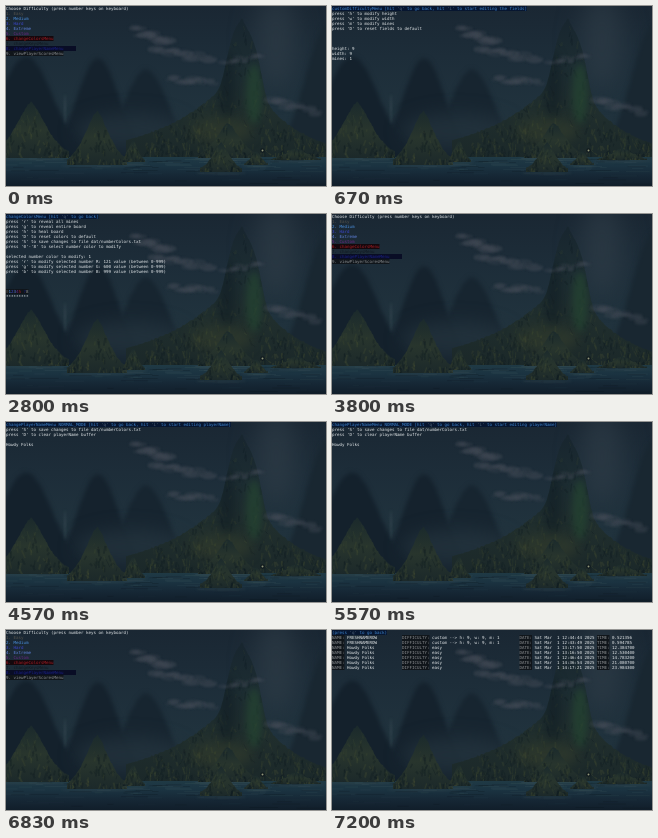
An HTML page with a canvas that plays this animation: 320 px wide and 180 px high, repeating every 8 s.

```html
<!DOCTYPE html>
<html lang="en">
<head>
<meta charset="utf-8">
<title>Terminal minesweeper menus</title>
<style>
html, body { margin: 0; width: 100%; height: 100%; overflow: hidden; background: #17222c; }
canvas { display: block; width: 320px; height: 180px; }
</style>
</head>
<body>
<canvas id="stage" width="320" height="180"></canvas>
<script>
const W = 320, H = 180, LOOP = 8000, SHORE = 152;
const ZOOM = 4, CELL_W = 2.5, CELL_H = 5;
const WHITE = '#e6eaec', BLUE = '#3f86cf', NAVY = '#071630', GREY = '#8d9093', BLACK = '#10151a';
const PALETTE = ['#55534c', '#4a90e0', '#3d47d2', '#5f82de', '#6a2785', '#a91e25', '#101820', '#1b2088', GREY];

function layer(zoom, paint) {
  const c = document.createElement('canvas');
  c.width = W * zoom;
  c.height = H * zoom;
  const g = c.getContext('2d');
  g.scale(zoom, zoom);
  paint(g);
  return c;
}

// Seeded generator, so the painting is the same on every load
let seed = 17;
const random = () => (seed = (seed * 16807) % 2147483647) / 2147483647;
const spread = size => (random() + random() - 1) * size;

function vertical(g, top, bottom, ...colors) {
  const r = g.createLinearGradient(0, top, 0, bottom);
  colors.forEach((c, i) => r.addColorStop(i / (colors.length - 1), c));
  return r;
}

function glow(g, color, x, y, rx, ry, blur) {
  g.filter = `blur(${blur}px)`;
  g.fillStyle = color;
  g.beginPath();
  g.ellipse(x, y, rx, ry, 0, 0, 7);
  g.fill();
  g.filter = 'none';
}

// Outline of the land under a height function, with a slightly broken edge
function land(height, from, to, base, rough) {
  const p = new Path2D();
  p.moveTo(from, base);
  for (let x = from; x <= to; x++) p.lineTo(x, base - height(x) + spread(rough));
  p.lineTo(to, base);
  return p;
}

const bell = (d, power) => Math.exp(-(Math.abs(d) ** power));

function distantHill(g, color, x, top, half) {
  g.fillStyle = color;
  g.filter = 'blur(2px)';
  g.fill(land(px => (SHORE - top) * bell((px - x) / half, 2), x - half * 2, x + half * 2, SHORE, 2));
  g.filter = 'none';
}

// Brush dabs running down a slope: olive towards the light, dark in the folds
function dabs(g, count, height, from, to, base) {
  for (let i = 0; i < count; i++) {
    const x = from + random() * (to - from);
    const depth = random();
    const y = base - height(x) * (1 - depth);
    g.strokeStyle = i % 2 ? `rgba(76,84,52,${0.12 + depth * 0.2})` : 'rgba(11,22,29,.25)';
    g.lineWidth = 0.6 + random() * 1.5;
    g.beginPath();
    g.moveTo(x, y);
    g.lineTo(x + spread(4), y + 2 + random() * 6);
    g.stroke();
  }
}

function islet(g, x, top, half, base = SHORE) {
  const h = base - top, from = x - half, to = x + half;
  const height = px => h * bell((px - x) / half * 1.7, 1.5);
  const outline = land(height, from, to, base, 1.2);
  glow(g, 'rgba(64,82,86,.35)', x, base + 1, half * 1.2, 1.2, 1);
  g.save();
  g.fillStyle = vertical(g, top, base, '#1b2a2c', '#28352d', '#1c292a');
  g.fill(outline);
  g.clip(outline);
  dabs(g, half * 3, height, from, to, base);
  g.restore();
}

function cloud(g, x0, y0, x1, y1, size) {
  for (let t = 0; t <= 1; t += 0.06) {
    const r = size * (0.5 + random() * 0.6);
    glow(g, 'rgba(72,78,87,.27)', x0 + (x1 - x0) * t + spread(size), y0 + (y1 - y0) * t + spread(size * 0.7), r * 1.5, r * 0.55, 1.2);
  }
}

// A broad foot, longer on the left, carrying a steep rounded tower
const peak = x => 94 * bell((x - 236) / (x < 236 ? 70 : 45), 1) + 46 * bell((x - 238) / 19, 4);

function mountain(g) {
  const outline = land(peak, 120, W, SHORE, 1);
  g.save();
  g.fillStyle = vertical(g, 16, SHORE, '#18262f', '#1d2d32', '#202e2d', '#1b2829');
  g.fill(outline);
  g.clip(outline);
  dabs(g, 380, peak, 140, W, SHORE);
  glow(g, 'rgba(14,26,34,.5)', 221, 80, 9, 35, 5);
  glow(g, 'rgba(36,67,50,.75)', 248, 88, 8, 30, 3);
  glow(g, 'rgba(63,70,45,.4)', 215, 125, 32, 13, 6);
  g.restore();
}

function water(g) {
  g.fillStyle = vertical(g, SHORE - 2, H, '#203a45', '#1b3341', '#162735', '#111e2a');
  g.fillRect(0, SHORE - 1, W, H);
  for (let i = 0; i < 110; i++) {
    const depth = random() ** 1.5;
    g.fillStyle = i % 3 ? `rgba(68,93,98,${0.3 * (1 - depth)})` : 'rgba(8,18,27,.25)';
    g.fillRect(random() * W - 10, SHORE + depth * 26, 5 + random() * 25, 0.8);
  }
}

function pointer(g) {
  glow(g, '#0f181d', 256.5, 144.5, 2.2, 2.2, 0.3);
  glow(g, '#929679', 256.5, 144.5, 1, 1, 0.3);
}

function landscape(g) {
  g.fillStyle = vertical(g, 0, SHORE, '#1a2733', '#1d2d39', '#20323d', '#1f313b');
  g.fillRect(0, 0, W, H);
  glow(g, 'rgba(48,62,73,.65)', 270, 35, 22, 48, 12);
  distantHill(g, '#172530', 140, 64, 32);
  distantHill(g, '#15222d', 92, 52, 30);
  distantHill(g, '#14212c', 20, 50, 38);
  distantHill(g, '#192731', 322, 18, 32);
  glow(g, 'rgba(40,58,68,.6)', 125, 125, 55, 18, 9);
  glow(g, 'rgba(65,84,93,.45)', 59, 103, 1, 15, 1);

  cloud(g, 126, 23, 165, 36, 6);
  cloud(g, 152, 42, 206, 54, 6);
  cloud(g, 162, 73, 207, 76, 5);
  mountain(g);
  cloud(g, 220, 56, 256, 50, 4);
  cloud(g, 262, 94, 312, 106, 6);

  water(g);
  islet(g, 25, 96, 38);
  islet(g, 91, 105, 30, 159);
  islet(g, 127, 134, 12, 156);
  islet(g, 222, 117, 30);
  islet(g, 215, 136, 21, 166);
  islet(g, 250, 145, 12, 159);
  islet(g, 290, 142, 25, 154);
  pointer(g);
}

function put(g, col, row, text, fg = WHITE, bg, width = text.length) {
  if (bg) {
    g.fillStyle = bg;
    g.fillRect(col * CELL_W, row * CELL_H, width * CELL_W, CELL_H);
  }
  g.fillStyle = fg;
  [...text].forEach((ch, i) => g.fillText(ch, (col + i) * CELL_W, row * CELL_H + 3.9));
}

function lines(g, row, texts) {
  texts.forEach((t, i) => put(g, 0, row + i, t));
}

// Header in blue with its key names dimmed
function header(g, text) {
  put(g, 0, 0, text, BLUE, NAVY);
  for (const m of text.matchAll(/'.'/g)) put(g, m.index, 0, m[0], '#53677b', NAVY);
}

function mainMenu(g) {
  put(g, 0, 0, 'Choose Difficulty (press number keys on keyboard)');
  const items = ['Easy', 'Medium', 'Hard', 'Extreme', 'Custom', 'changeColorsMenu',
    'changeKeysMenu', 'changePlayerNameMenu', 'viewPlayerScoresMenu'];
  const backs = { changeColorsMenu: '#14080d', changePlayerNameMenu: '#090d25', viewPlayerScoresMenu: BLACK };
  items.forEach((name, i) => {
    const text = `${i + 1}. ${name}`;
    put(g, 0, i + 1, name === 'changePlayerNameMenu' ? text.padEnd(28) : text, PALETTE[i], backs[name]);
  });
}

function customMenu(g) {
  header(g, "customDifficultyMenu [hit 'q' to go back, hit 'i' to start editing the fields]");
  lines(g, 1, [
    "press 'h' to modify height",
    "press 'w' to modify width",
    "press 'm' to modify mines",
    "press 'D' to reset fields to default"
  ]);
  lines(g, 8, ['height: 9', 'width: 9', 'mines: 1']);
}

function colorsMenu(g) {
  header(g, "changeColorsMenu [hit 'q' to go back]");
  const channels = { r: 121, g: 600, b: 999 };
  lines(g, 1, [
    "press 'r' to reveal all mines",
    "press 'g' to reveal entire board",
    "press 'h' to heal board",
    "press 'D' to reset colors to default",
    "press 'S' to save changes to file dat/numberColors.txt",
    "press '0'-'8' to select number color to modify",
    '',
    'selected number color to modify: 1',
    ...Object.entries(channels).map(([key, value]) =>
      `press '${key}' to modify selected number ${key.toUpperCase()}: ${value} value (between 0-999)`)
  ]);
  PALETTE.forEach((c, i) => put(g, i, 15, String(i), c, BLACK));
  put(g, 0, 16, '*********');
}

function nameMenu(g) {
  header(g, "changePlayerNameMenu NORMAL_MODE [hit 'q' to go back, hit 'i' to start editing playerName]");
  lines(g, 1, [
    "press 'S' to save changes to file dat/numberColors.txt",
    "press 'D' to clear playerName buffer",
    '',
    'Howdy Folks'
  ]);
}

function scores(g) {
  header(g, "(press 'q' to go back)");
  const results = ['12:44:44 0.521356', '12:43:49 0.594785', '13:17:50 12.384700', '13:16:50 12.530400',
    '12:46:44 14.783200', '14:36:54 21.080700', '14:17:21 23.984300'];
  results.forEach((result, i) => {
    const [clock, time] = result.split(' ');
    const isCustom = i < 2;
    const field = (col, label, value) => {
      put(g, col, i + 1, label, GREY, BLACK);
      put(g, col + label.length + 1, i + 1, value);
    };
    field(0, 'NAME:', isCustom ? 'FRESHNAMEROW' : 'Howdy Folks');
    field(28, 'DIFFICULTY:', isCustom ? 'custom --> h: 9, w: 9, m: 1' : 'easy');
    field(75, 'DATE:', `Sat Mar  1 ${clock} 2025`);
    field(106, 'TIME:', time);
  });
}

const backdrop = layer(1, landscape);

function screen(paint) {
  const text = layer(ZOOM, g => {
    g.font = '4.15px "DejaVu Sans Mono", monospace';
    paint(g);
  });
  return layer(1, g => {
    g.drawImage(backdrop, 0, 0);
    g.imageSmoothingQuality = 'high';
    g.drawImage(text, 0, 0, W, H);
  });
}

const menu = screen(mainMenu);
const steps = [
  [0, menu],
  [500, screen(customMenu)],
  [1770, menu],
  [2800, screen(colorsMenu)],
  [3670, menu],
  [4570, screen(nameMenu)],
  [5770, menu],
  [6870, screen(scores)]
];

const view = document.getElementById('stage').getContext('2d');
const start = performance.now();

function draw(now) {
  const t = Math.max(0, now - start) % LOOP;
  view.drawImage(steps.findLast(([at]) => at <= t)[1], 0, 0);
  requestAnimationFrame(draw);
}
draw(start);
</script>
</body>
</html>
```
